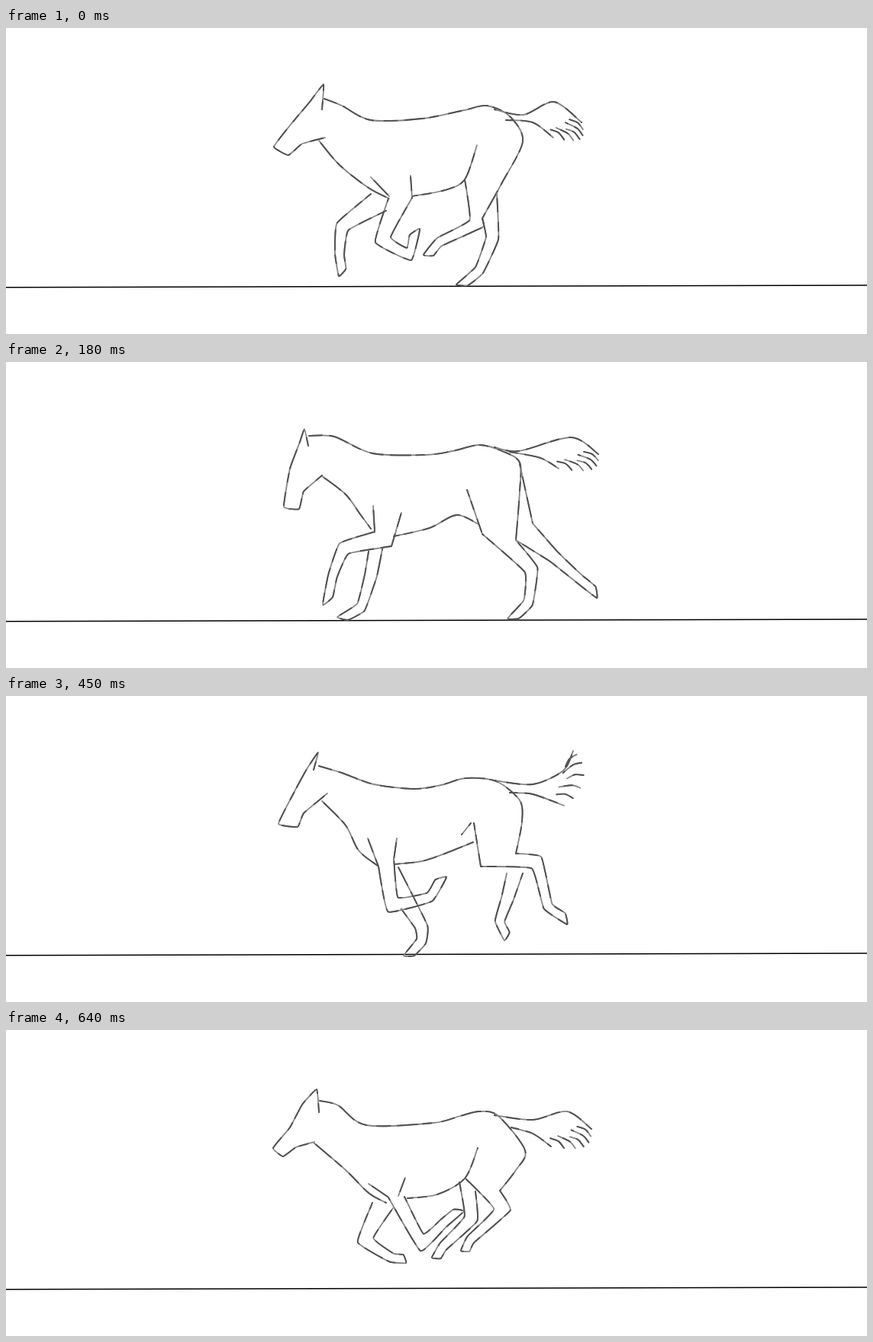
Write an HTML page with a canvas that moves like this. It is 1128x402 px and loops after 730 ms.

```html
<!DOCTYPE html>
<html lang="en">
<head>
<meta charset="utf-8">
<title>Galloping horse</title>
<style>
html, body { margin: 0; width: 100%; height: 100%; overflow: hidden; background: #fff }
canvas { display: block }
</style>
</head>
<body>
<canvas id="stage" width="1128" height="402"></canvas>
<script>
const ctx = document.getElementById('stage').getContext('2d');
const LOOP = 730;

const mix = (a, b, s) => a.map((v, i) => v + (b[i] - v) * s);
const add = (p, d, s) => [p[0] + d[0] * s, p[1] + d[1] * s];
const unit = (a, b) => {
  const x = b[0] - a[0], y = b[1] - a[1], len = Math.hypot(x, y) || 1;
  return [x / len, y / len];
};
const chunks = (list, size) =>
  Array.from({ length: list.length / size }, (_, i) => list.slice(i * size, i * size + size));
const points = list => chunks(list, 2);

// Legs hold: front start, back start, knee, fetlock, toe.
const gather = {
  head: [414, 107, 416, 74, 398, 97, 372, 128, 351, 156, 370, 167, 388, 152, 418, 144],
  back: [417, 93, 440, 102, 478, 121, 545, 119, 600, 108, 630, 102, 660, 116, 677, 149, 650, 203, 624, 250],
  chest: [410, 148, 437, 180, 475, 210, 502, 224],
  belly: [532, 221, 575, 213, 601, 199, 617, 154],
  marks: [530, 194, 532, 223, 478, 196, 502, 221],
  tail: [640, 107, 678, 114, 718, 97, 754, 124, 655, 121, 690, 124, 717, 144],
  fore: [478, 218, 498, 240, 441, 261, 437, 297, 436, 326, 501, 224, 532, 223, 494, 278, 528, 297, 542, 264],
  hind: [601, 199, 624, 250, 616, 257, 568, 281, 547, 298, 624, 250, 643, 217, 637, 276, 620, 318, 590, 337]
};

const land = {
  head: [396, 110, 391, 88, 385, 105, 372, 140, 364, 190, 384, 193, 390, 170, 414, 149],
  back: [397, 97, 430, 98, 480, 120, 550, 122, 585, 117, 620, 109, 650, 117, 673, 132, 673, 170, 668, 234],
  chest: [414, 150, 445, 174, 464, 200, 478, 219],
  belly: [508, 229, 555, 218, 590, 201, 619, 213],
  marks: [518, 198, 505, 242, 481, 189, 483, 222, 604, 168, 624, 226, 673, 134, 690, 212],
  tail: [640, 112, 672, 117, 740, 99, 776, 121, 660, 118, 700, 126, 724, 140],
  fore: [475, 249, 493, 246, 478, 280, 465, 322, 434, 335, 483, 223, 505, 242, 443, 245, 428, 281, 415, 319],
  hind: [624, 226, 668, 234, 688, 273, 684, 316, 657, 337, 668, 234, 690, 212, 718, 256, 750, 284, 774, 310]
};

const reach = {
  head: [397, 98, 387, 75, 381, 100, 374, 135, 368, 184, 384, 188, 392, 168, 411, 150],
  back: [401, 94, 430, 94, 485, 112, 535, 119, 580, 114, 620, 107, 650, 110, 672, 125, 678, 165, 681, 204],
  chest: [406, 145, 436, 154, 455, 183, 466, 211],
  belly: [494, 211, 540, 214, 575, 203, 606, 191],
  marks: [471, 165, 466, 211, 514, 183, 492, 214, 609, 167, 626, 196, 598, 167, 593, 181, 606, 191, 640, 211],
  tail: [620, 107, 675, 110, 745, 92, 785, 122, 655, 115, 720, 124, 733, 136],
  fore: [466, 211, 492, 222, 440, 254, 392, 301, 350, 309, 502, 218, 522, 217, 532, 282, 541, 320, 515, 338],
  hind: [640, 211, 681, 204, 722, 250, 755, 284, 781, 314, 700, 220, 700, 215, 733, 231, 771, 247, 798, 240]
};

const tuck = {
  head: [403, 97, 409, 74, 394, 96, 374, 133, 357, 168, 382, 172, 390, 154, 421, 128],
  back: [410, 92, 440, 101, 482, 116, 535, 122, 570, 117, 602, 108, 642, 112, 673, 137, 676, 165, 668, 207],
  chest: [414, 138, 445, 170, 462, 203, 487, 223],
  belly: [509, 221, 545, 217, 575, 207, 612, 192],
  marks: [474, 187, 488, 224, 512, 187, 508, 215, 613, 167, 622, 224, 609, 167, 597, 182],
  tail: [640, 111, 690, 116, 730, 98, 743, 72, 660, 127, 690, 129, 731, 144],
  fore: [518, 280, 514, 225, 544, 303, 544, 322, 521, 341, 488, 224, 508, 213, 507, 274, 555, 264, 577, 238],
  hind: [622, 224, 668, 207, 695, 219, 710, 276, 735, 300, 656, 233, 677, 233, 657, 266, 647, 296, 653, 321]
};

const push = {
  head: [420, 112, 416, 77, 400, 98, 380, 122, 358, 159, 376, 166, 390, 153, 415, 147],
  back: [419, 95, 440, 101, 490, 125, 550, 128, 580, 121, 605, 109, 640, 109, 679, 135, 685, 157, 681, 195],
  chest: [415, 148, 445, 178, 475, 212, 508, 234],
  belly: [540, 227, 570, 219, 600, 203, 619, 190],
  marks: [534, 185, 534, 220, 624, 159, 622, 205, 490, 219, 512, 232],
  tail: [660, 115, 690, 109, 730, 112, 764, 98, 680, 127, 700, 135, 712, 146],
  fore: [512, 231, 535, 221, 565, 276, 603, 306, 617, 338, 507, 232, 526, 246, 515, 285, 560, 280, 579, 257],
  hind: [622, 205, 681, 195, 692, 216, 674, 267, 678, 290, 612, 194, 655, 214, 651, 241, 617, 265, 607, 285]
};

const float = {
  head: [410, 108, 407, 78, 388, 98, 372, 128, 350, 155, 363, 166, 380, 154, 404, 147],
  back: [411, 93, 435, 99, 472, 125, 560, 122, 595, 113, 620, 107, 645, 113, 680, 158, 668, 184, 647, 211],
  chest: [403, 148, 445, 184, 475, 214, 498, 227],
  belly: [526, 221, 565, 216, 601, 195, 618, 155],
  marks: [523, 194, 514, 218, 475, 202, 500, 219],
  tail: [640, 112, 690, 118, 735, 107, 767, 130, 662, 128, 690, 136, 714, 153],
  fore: [480, 227, 507, 234, 471, 276, 505, 299, 524, 306, 501, 220, 522, 219, 545, 279, 573, 254, 600, 238],
  hind: [594, 200, 615, 212, 609, 248, 573, 284, 558, 299, 603, 196, 647, 211, 650, 236, 609, 275, 596, 290]
};

function between(a, b) {
  const pose = {};
  for (const part in a) {
    const size = Math.min(a[part].length, b[part].length);
    pose[part] = mix(a[part].slice(0, size), b[part], 0.5);
  }
  return pose;
}

// Outline of a leg: parallel lines around the joints, ending in a wedge hoof.
function legOutline([front, back, knee, fetlock, toe]) {
  const joint = (from, mid, to, width) => {
    const a = unit(from, mid), b = unit(mid, to);
    const dir = unit([0, 0], [a[0] + b[0], a[1] + b[1]]);
    const side = width / Math.max(0.7, a[0] * dir[0] + a[1] * dir[1]);
    return [add(mid, [-dir[1], dir[0]], side), add(mid, [dir[1], -dir[0]], side)];
  };
  const [kneeFront, kneeBack] = joint(mix(front, back, 0.5), knee, fetlock, 8);
  const [fetFront, fetBack] = joint(knee, fetlock, toe, 6);
  const dir = unit(fetlock, toe);
  const heel = add(mix(fetlock, toe, 0.65), [dir[1], -dir[0]], 9);
  return [front, kneeFront, fetFront, toe, heel, fetBack, kneeBack, back];
}

// Two edges of the tail, with wisps fanned between their tips.
function tailStrokes(list) {
  const [rootU, bendU, midU, tipU, rootL, midL, tipL] = points(list);
  const strokes = [[rootU, bendU, midU, tipU], [rootL, midL, tipL]];
  for (let k = 1; k < 6; k++) {
    const s = k / 6, end = mix(tipL, tipU, s);
    const dir = unit(mix(midL, midU, s), end);
    const tip = add(end, dir, 20 * Math.sin(Math.PI * s));
    const bow = add(add(tip, dir, -11), [dir[1], -dir[0]], 3);
    strokes.push([add(tip, dir, k % 2 ? -22 : -28), bow, tip]);
  }
  return strokes;
}

// A tight spline keeps long lines soft and hooves angular.
function trace(pts, tight) {
  const path = new Path2D(), at = i => pts[Math.max(0, Math.min(pts.length - 1, i))];
  const handle = (i, side) => at(i).map((v, k) => v + side * tight * (at(i + 1)[k] - at(i - 1)[k]));
  path.moveTo(...pts[0]);
  for (let i = 0; i < pts.length - 1; i++)
    path.bezierCurveTo(...handle(i, 1), ...handle(i + 1, -1), ...at(i + 1));
  return path;
}

function sketch(pose) {
  const soft = [pose.back, pose.chest, pose.belly].map(points).concat(tailStrokes(pose.tail));
  const legs = chunks([...pose.fore, ...pose.hind], 10).map(leg => legOutline(points(leg)));
  const firm = [points(pose.head), ...chunks(pose.marks, 4).map(points), ...legs];
  return [...soft.map(s => trace(s, 0.15)), ...firm.map(s => trace(s, 0.06))];
}

const steps = [
  [0, gather], [90, between(gather, land)], [180, land], [270, reach],
  [360, between(reach, tuck)], [450, tuck], [550, push], [640, float]
].map(([start, pose]) => ({ start, paths: sketch(pose) }));

function pencil(path, i) {
  ctx.lineWidth = 1.8;
  ctx.strokeStyle = '#858585';
  ctx.setLineDash([]);
  ctx.stroke(path);
  ctx.lineWidth = 1.9;
  ctx.strokeStyle = '#505050';
  ctx.setLineDash([17, 10, 26, 7, 11, 14]);
  ctx.lineDashOffset = i * 23;
  ctx.stroke(path);
}

function draw() {
  const t = performance.now() % LOOP;
  ctx.fillStyle = '#fff';
  ctx.fillRect(0, 0, 1128, 402);
  ctx.lineCap = ctx.lineJoin = 'round';
  ctx.setLineDash([]);
  ctx.strokeStyle = '#000';
  ctx.lineWidth = 1.5;
  ctx.beginPath();
  ctx.moveTo(0, 340.7);
  ctx.lineTo(1128, 338);
  ctx.stroke();
  steps.findLast(s => s.start <= t).paths.forEach(pencil);
  requestAnimationFrame(draw);
}
draw();
</script>
</body>
</html>
```
